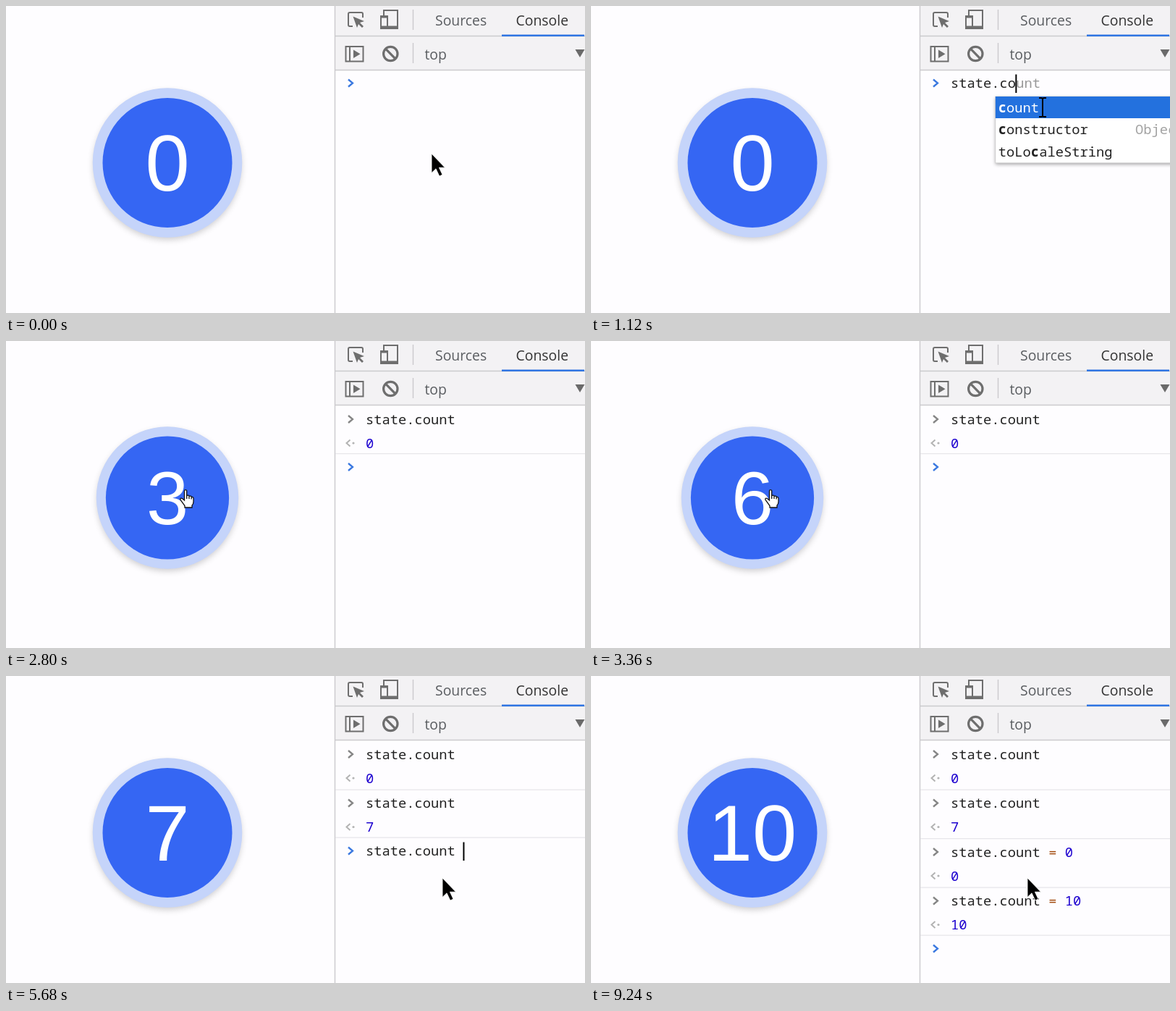
An HTML page for the animation above (9280 ms loop, 800x424 px).

```html
<!DOCTYPE html>
<html lang="en">
<head>
<meta charset="utf-8">
<title>Reactive counter</title>
<style>
html, body { margin: 0; width: 100%; height: 100%; overflow: hidden; background: #fefdff; }
svg { display: block; width: 100vw; height: 100vh; }
text { white-space: pre; }
.ui { font-family: "Open Sans", "Noto Sans", sans-serif; font-size: 19.4px; fill: #5a5d61; }
.code { font-family: "Noto Sans Mono", "DejaVu Sans Mono", monospace; font-size: 18.78px; fill: #222; }
.count { font-family: "Liberation Sans", Arial, sans-serif; font-size: 110px; fill: #fff; text-anchor: middle; }
.icon { fill: none; stroke: #6e6e6e; stroke-width: 2; }
</style>
</head>
<body>
<svg viewBox="0 0 800 424">
  <defs>
    <filter id="soft" x="-20%" y="-20%" width="140%" height="140%"><feGaussianBlur stdDeviation="5"/></filter>
    <filter id="drop" x="-5%" y="-10%" width="110%" height="125%"><feGaussianBlur stdDeviation="2.5"/></filter>
  </defs>
  <rect width="800" height="424" fill="#fefdff"/>

  <g id="button">
    <circle cy="4" r="102" fill="#000" opacity=".2" filter="url(#soft)"/>
    <circle r="103.3" fill="#c5d4fa"/>
    <circle r="89.5" fill="#3566f3"/>
    <text id="count" class="count" y="38.5"></text>
  </g>

  <rect x="455" width="345" height="88" fill="#f3f2f4"/>
  <path d="M454.5 0V424M455 41.5H800M455 88.5H800M562.5 5V33M562.5 51V79" stroke="#cbcacd" stroke-width="1.4"/>
  <rect x="685" y="39.5" width="114" height="2.5" fill="#2f75e2"/>
  <text class="ui" x="593" y="27">Sources</text>
  <text class="ui" x="704.5" y="27" style="fill:#333">Console</text>
  <text class="ui" x="578.5" y="73.5">top</text>
  <path d="M786.5 60H799.5L793 71Z" fill="#6a6a6a"/>
  <g class="icon">
    <path d="M479 28H475Q473 28 473 26V11Q473 9 475 9H491Q493 9 493 11V16"/>
    <path d="M479.5 14.5L495 21L489 23L494 28L492 30L487 25L485 30Z" fill="#6e6e6e" stroke="none"/>
    <path d="M522 13V6H541V31H528"/>
    <rect x="518" y="14" width="9" height="17"/>
    <path d="M518 15H527M518 29H527M528 29H541" stroke-width="3"/>
    <rect x="469.5" y="56" width="24" height="20.5"/>
    <path d="M475 56V76"/>
    <path d="M480 60.5V72L489.5 66.2Z" fill="#6e6e6e" stroke="none"/>
    <path d="M541 66A9.7 9.7 0 1 1 521.6 66A9.7 9.7 0 1 1 541 66M524.5 59.2L538 72.8" stroke-width="3.2"/>
  </g>

  <g id="log"></g>
  <g id="popup"></g>
  <g id="mouse">
    <path id="arrow" d="M0 0V26.5L6 20.8L10.8 31L15 29L10.4 19.2H18.5Z" stroke="#fff" stroke-width=".8"/>
    <path id="beam" d="M-5 -13H-2Q0 -13 0 -11.5Q0 -13 2 -13H5M0 -12V12M-5 13H-2Q0 13 0 11.5Q0 13 2 13H5" fill="none" stroke="#000" stroke-width="2"/>
    <path id="hand" d="M-1.5 2Q-1.5 0.6 0 .6Q1.7 .6 1.7 2V8.6Q4.6 7.4 5 9.4Q8 8.4 8.2 10.6Q11 10 11 12.6V17Q11 20 9 22V25H-1V22.5L-6.6 15Q-8 12.6 -6 12.2Q-4.6 12 -1.5 15Z M1.7 9V13M5 10V13M8.2 11V13.6" fill="#fff" stroke="#111" stroke-width="1.3"/>
  </g>
</svg>

<script>
const LOOP = 9280, STEP = 40, BLINK = 400;
const CHAR = 11.27, LEFT = 497, ROW = 67.5;
const $ = id => document.getElementById(id);

// [time of Enter, command, result]
const entries = [
  [1640, 'state.count', '0'],
  [4720, 'state.count', '7'],
  [6680, 'state.count = 0', '0'],
  [8840, 'state.count = 10', '10']
];

// [time, prompt text]
const typing = [
  [400, ''], [480, 's'], [560, 'st'], [640, 'sta'], [720, 'stat'], [800, 'state'],
  [880, 'state.'], [1040, 'state.c'], [1120, 'state.co'], [1200, 'state.cou'],
  [1280, 'state.coun'], [1360, 'state.count'], [1640, ''],
  [3880, ''], [4240, 'state.count'], [4720, ''],
  [5400, 'state.count'], [5680, 'state.count '], [5840, 'state.count ='],
  [6000, 'state.count = '], [6360, 'state.count = 0'], [6680, ''],
  [7680, 'state.count = 0'], [8040, 'state.count = '], [8240, 'state.count = 1'],
  [8400, 'state.count = 10'], [8840, '']
];

// [time, column, matched letters, suggestions]
const hints = [
  [480, 0, 's', 'state self screen scroll scrollBy scrollTo scrollX scrollY status stop'],
  [560, 0, 'st', 'state status statusbar stop styleMedia'],
  [640, 0, 'sta', 'state status statusbar'],
  [720, 0, 'stat', 'state status statusbar'],
  [800, 0, 'state', 'state'],
  [880, 6, '', 'count constructor hasOwnProperty isPrototypeOf propertyIsEnumerable toLocaleString toString valueOf __defineGetter__ __defineSetter__'],
  [1040, 6, 'c', 'count constructor toLocaleString'],
  [1160, 6, 'co', 'count constructor'],
  [1200, 6, 'cou', 'count'],
  [1360, 0, '', '']
];

// [time, x, y]
const path = [
  [40, 588, 204], [440, 624, 140], [1880, 624, 140], [2280, 248, 205],
  [3440, 248, 205], [3840, 614, 176], [4040, 614, 176], [4320, 609, 201],
  [4440, 609, 201], [4760, 606, 265], [4920, 606, 265], [5160, 603, 279]
];

const clicks = Array.from({ length: 7 }, (_, i) => 2360 + 175 * i);
const clamp = v => Math.min(1, Math.max(0, v));
const ease = v => v * v * (3 - 2 * v);
const latest = (list, t) => list.filter(item => item[0] <= t).pop();

function mouseAt(t) {
  const i = path.findIndex(p => p[0] > t);
  if (i === 0) return path[0].slice(1);
  if (i < 0) return path[path.length - 1].slice(1);
  const [a, b] = [path[i - 1], path[i]];
  const k = ease((t - a[0]) / (b[0] - a[0]));
  return [a[1] + (b[1] - a[1]) * k, a[2] + (b[2] - a[2]) * k];
}

const code = (x, y, body, fill = '#222') =>
  `<text class="code" x="${x}" y="${y}" fill="${fill}" style="fill:${fill}">${body}</text>`;

const paint = s => s.replace(/=|\d+/g, m =>
  `<tspan style="fill:${m === '=' ? '#a0480a' : '#1c00cf'}">${m}</tspan>`);

const chevron = (y, color) =>
  `<path d="M473 ${y - 5}L479 ${y}L473 ${y + 5}" fill="none" stroke="${color}" stroke-width="2.3"/>`;

const rule = y => `<path d="M455 ${y}H800" stroke="#e7e6ea" stroke-width="1.3"/>`;

function drawEntry([, command, result], i, last) {
  const y = 108 + ROW * i;
  return chevron(y, '#858585') + code(LEFT, y + 6.5, paint(command)) +
    `<path d="M475.5 ${y + 28.5}L470.5 ${y + 33}L475.5 ${y + 37.5}" fill="none" stroke="#b3b3b3" stroke-width="2"/>` +
    `<circle cx="480" cy="${y + 33}" r="1.6" fill="#b3b3b3"/>` +
    code(LEFT, y + 39.5, result, '#1c00cf') + rule(y + (last ? 47.7 : 49.2));
}

function drawPrompt(t, row, hint) {
  const typed = latest(typing, t);
  const text = typed ? typed[1] : '';
  const y = 107 + ROW * row, end = LEFT + text.length * CHAR;
  const focused = (t >= 400 && t < 2280) || t >= 3880;
  let out = chevron(y - .5, '#3a78e0') + code(LEFT, y + 6.3, paint(text));
  if (hint && hint[3]) {
    const rest = hint[3].split(' ')[0].slice(text.length - hint[1]);
    out += code(end, y + 6.3, rest, '#999');
  }
  if (focused && Math.floor((t - typed[0]) / BLINK) % 2 === 0)
    out += `<rect x="${end - .8}" y="${y - 12.5}" width="2" height="25.5" fill="#000"/>`;
  return out;
}

function drawPopup(hint) {
  if (!hint || !hint[3]) return '';
  const [, col, match, list] = hint;
  const words = list.split(' '), h = 30.6, top = 125;
  const x = LEFT + col * CHAR - 5.8;
  const box = `x="${x}" y="${top}" width="330" height="${h * words.length}"`;
  let out = `<rect ${box} transform="translate(0 2)" opacity=".35" filter="url(#drop)"/>` +
    `<rect ${box} fill="#fff" stroke="#ccc" stroke-width=".8"/>` +
    `<rect x="${x}" y="${top}" width="330" height="30" fill="#2371de"/>`;
  words.forEach((word, i) => {
    const body = match ? word.replace(match, `<tspan font-weight="700">${match}</tspan>`) : word;
    out += code(x + 4, top + 21.5 + h * i, body, i ? '#222' : '#fff');
  });
  if (col && words.length > 1) out += code(752, top + 21.5 + h, 'Object', '#a3a3a3');
  return out;
}

function countAt(t) {
  if (t >= entries[3][0]) return 10;
  if (t >= entries[2][0]) return 0;
  return clicks.filter(c => c <= t).length;
}

// pressed shortly before each click, released on it
const pressAt = t => Math.max(...clicks.map(c =>
  t < c ? clamp((t - c + 130) / 40) : clamp(1 - (t - c) / 40)));

function render(t) {
  const done = entries.filter(e => e[0] <= t);
  const hint = latest(hints, t);
  const [x, y] = mouseAt(t);

  $('button').setAttribute('transform', `translate(223 216.5) scale(${1 - .049 * pressAt(t)})`);
  $('count').textContent = countAt(t);
  $('log').innerHTML = done.map((e, i) => drawEntry(e, i, i === done.length - 1)).join('') +
    drawPrompt(t, done.length, hint);
  $('popup').innerHTML = drawPopup(hint);

  const kind = Math.hypot(x - 223, y - 216.5) < 103 ? 'hand'
    : t >= 240 && t < 1960 ? 'beam' : 'arrow';
  for (const id of ['arrow', 'beam', 'hand'])
    $(id).style.display = id === kind ? '' : 'none';
  $('mouse').setAttribute('transform', `translate(${x} ${y})`);
}

const start = performance.now();
function tick() {
  const t = (performance.now() - start) % LOOP;
  render(Math.floor(t / STEP) * STEP);
  requestAnimationFrame(tick);
}
tick();
</script>
</body>
</html>
```
